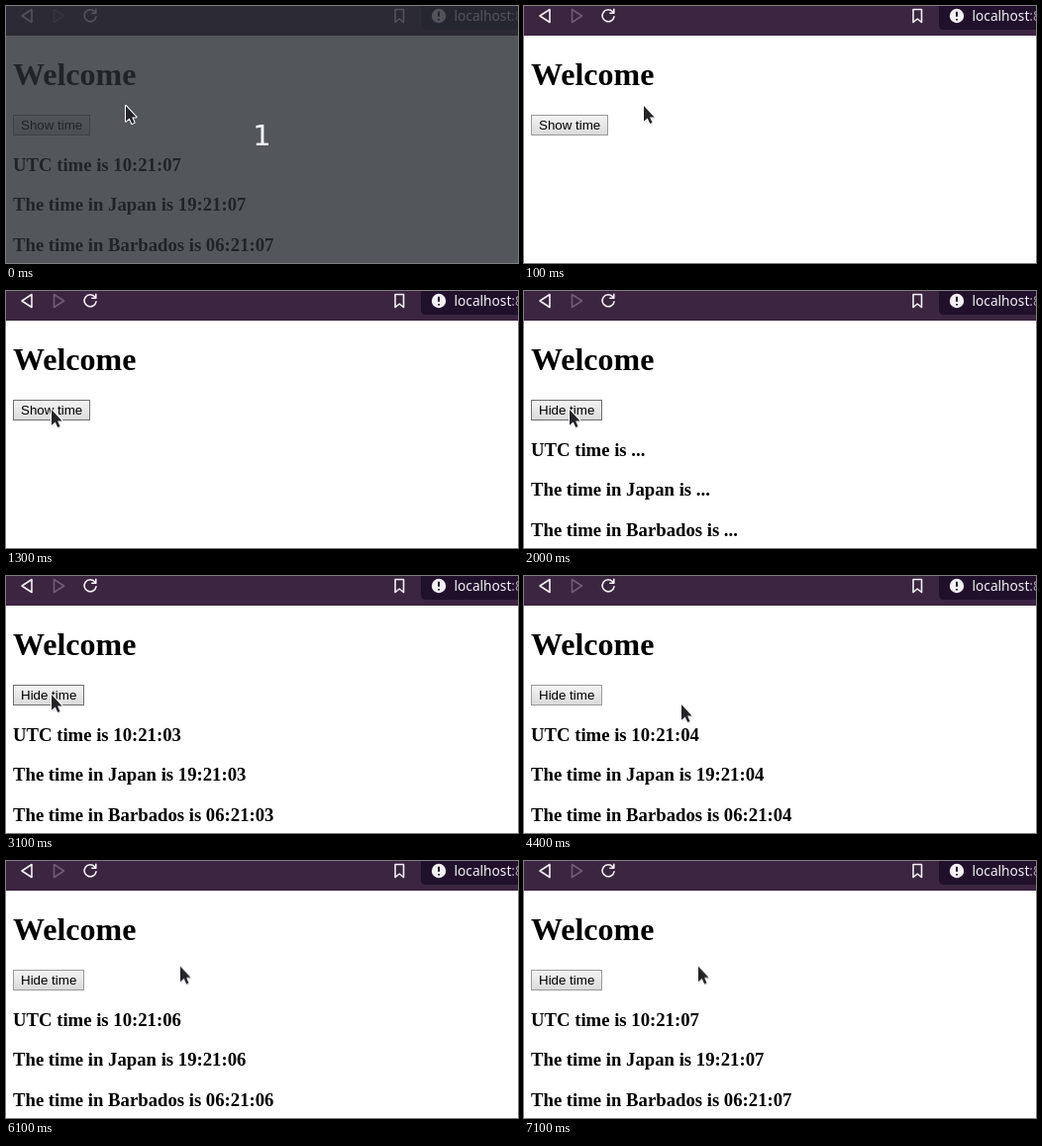
Recreate the animation shown at these times as an HTML page. Size 517 by 260 pixels, loop 8 s.

```html
<!DOCTYPE html>
<html lang="en">
<head>
<meta charset="utf-8">
<title>Show time</title>
<style>
  html, body { margin: 0; width: 100%; height: 100%; overflow: hidden; background: #fff; }
  svg { display: block; width: 517px; height: 260px; }
  .page { font: bold 18.72px "Liberation Serif", serif; }
  .page .title { font-size: 32px; }
  .button text { font: 13.333px "Liberation Sans", sans-serif; }
  .url { font: 13.7px "Noto Sans", sans-serif; fill: #f4f0f5; }
  .count { font: 29px "DejaVu Sans", sans-serif; fill: #fff; text-anchor: middle; }
  .icon { fill: none; stroke: #f4f0f5; stroke-width: 1.6; stroke-linejoin: round; stroke-linecap: round; }

  .count, .shade, .show, .hide, .face, .press, .wait, .tick, .cursor {
    animation: 8s step-end infinite;
  }
  .count, .shade { animation-name: intro; }
  .show { animation-name: show; }
  .hide { opacity: 0; animation-name: hide; }
  .face { stroke: #999; animation-name: hover; }
  .press { opacity: 0; animation-name: press; }
  .wait { opacity: 0; animation-name: wait; }
  .tick { opacity: 0; animation-name: tick; animation-delay: calc((var(--i) - 4.9) * 1s); }
  .cursor { transform: translate(121px, 101px); animation-name: move; }

  @keyframes intro { 0% { opacity: 1 } 1.25% { opacity: 0 } 100% { opacity: 0 } }
  @keyframes show { 0% { opacity: 1 } 25% { opacity: 0 } 100% { opacity: 0 } }
  @keyframes hide { 0% { opacity: 0 } 25% { opacity: 1 } 100% { opacity: 1 } }
  @keyframes hover { 15% { stroke: #6e6e6e } 52.5% { stroke: #999 } }
  @keyframes press { 23.75% { opacity: 1 } 25% { opacity: 0 } }
  @keyframes wait { 25% { opacity: 1 } 38.75% { opacity: 0 } }
  @keyframes tick { 0% { opacity: 1 } 12.5% { opacity: 0 } 100% { opacity: 0 } }
  @keyframes move {
    0% { transform: translate(121px, 101px) }
    7.5% { transform: translate(125px, 107px) }
    8.75% { transform: translate(118px, 124px) }
    10% { transform: translate(95px, 134px) }
    11.25% { transform: translate(74px, 136px) }
    13.75% { transform: translate(66px, 132px) }
    15% { transform: translate(51px, 124px) }
    16.25% { transform: translate(46px, 120px) }
    51.25% { transform: translate(48px, 122px) }
    52.5% { transform: translate(74px, 132px) }
    53.75% { transform: translate(119px, 136px) }
    55% { transform: translate(159px, 130px) }
    56.25% { transform: translate(170px, 118px) }
    57.5% { transform: translate(175px, 110px) }
    58.75%, 100% { transform: translate(176px, 106.5px) }
  }
</style>
</head>
<body>
<svg viewBox="0 0 517 260">
  <defs>
    <linearGradient id="up" x2="0" y2="1">
      <stop stop-color="#f4f4f4"/><stop offset="1" stop-color="#dadada"/>
    </linearGradient>
    <linearGradient id="down" x2="0" y2="1">
      <stop stop-color="#d4d4d4"/><stop offset="1" stop-color="#eaeaea"/>
    </linearGradient>
  </defs>

  <!-- toolbar -->
  <rect width="517" height="30" fill="#3b2540"/>
  <path d="M419 0H517V24H424Q419 24 419 19Z" fill="#20102c"/>
  <g class="icon">
    <path d="M16 10L26 3.5V16.5Z"/>
    <path d="M58.5 10L48.5 3.5V16.5Z" stroke="#705c75" style="stroke:#705c75"/>
    <path d="M89.6 5.8A6 6 0 1 0 91 10.8M90.8 3.2V7.2H86.8"/>
    <path d="M393 3.5H401.5V16.5L397.2 13L393 16.5Z"/>
  </g>
  <circle cx="437" cy="10" r="7.2" fill="#f4f0f5"/>
  <path d="M437 5.8V10.8M437 13V14.6" stroke="#20102c" stroke-width="2"/>
  <text class="url" x="452.5" y="15">localhost<tspan fill="#a89fae">:8000</tspan></text>

  <!-- page -->
  <g class="page" id="page">
    <text class="title" x="7" y="80">Welcome</text>
  </g>
  <g class="button show">
    <rect class="face" x="7.5" y="110.5" width="77" height="20" fill="url(#up)"/>
    <rect class="press" x="7.5" y="110.5" width="77" height="20" fill="url(#down)" stroke="#6e6e6e"/>
    <text x="15" y="125">Show time</text>
  </g>
  <g class="button hide">
    <rect class="face" x="7.5" y="110.5" width="71" height="20" fill="url(#up)"/>
    <text x="15" y="125">Hide time</text>
  </g>

  <rect class="shade" width="517" height="260" fill="#282c33" fill-opacity=".8"/>
  <text class="count" x="258.5" y="141">1</text>

  <g class="cursor">
    <path d="M.6 1.5V17.4L4.4 13.9L7 19.4L9.6 18.2L7.1 12.9H11.6Z" fill="#000" opacity=".16"/>
    <path d="M0 0V15.8L3.7 12.4L6.2 18L8.6 16.9L6.1 11.4H10.6Z" fill="#262428"
      stroke="#fff" stroke-width="2" stroke-linejoin="round" paint-order="stroke"/>
  </g>
</svg>
<script>
  const rows = [["UTC time is", 10, 167], ["The time in Japan is", 19, 207], ["The time in Barbados is", "06", 248]];

  const lines = clock => rows.map(([label, hour, y]) =>
    `<text x="7" y="${y}">${label} ${clock(hour)}</text>`).join("");

  let html = `<g class="wait">${lines(() => "...")}</g>`;
  for (let i = 0; i < 5; i++) {
    html += `<g class="tick" style="--i:${i}">${lines(hour => `${hour}:21:0${i + 3}`)}</g>`;
  }
  document.getElementById("page").insertAdjacentHTML("beforeend", html);
</script>
</body>
</html>
```
